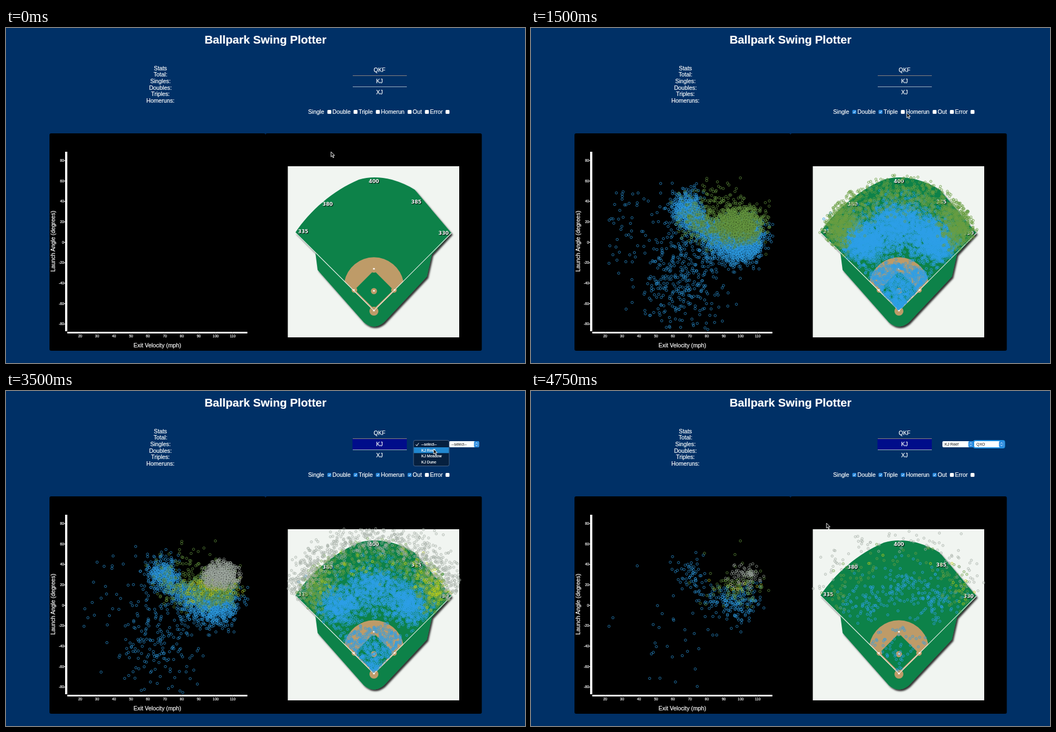
An HTML page with a canvas for the animation above (5 s loop, 931 by 601 pixels).

```html
<!DOCTYPE html>
<html lang="en">
<head>
<meta charset="utf-8">
<title>Ballpark Swing Plotter</title>
<style>
  html, body { margin: 0; width: 100%; height: 100%; overflow: hidden; background: #003066; }
  svg, canvas { position: absolute; left: 0; top: 0; width: 931px; height: 601px; }
  text { font: 10.3px "Liberation Sans", Arial, sans-serif; fill: #fff; stroke: #fff; stroke-width: .2px; }
  .title { font-size: 20.6px; font-weight: bold; }
  .mid text, .mid { text-anchor: middle; }
  .tick { font-size: 6.4px; }
  .small text { font-size: 7px; }
  .wall text { font: bold 8.8px "DejaVu Sans", sans-serif; text-anchor: middle; stroke: none; text-shadow: 1px 1px 1px #000; }
  .dark { fill: #111; stroke: none; }
</style>
</head>
<body>
<svg id="base" viewBox="0 0 931 601">
  <defs>
    <filter id="shadow" x="-10%" y="-10%" width="120%" height="120%">
      <feDropShadow dx="2.5" dy="3" stdDeviation="1.5" flood-color="#000" flood-opacity=".8"/>
    </filter>
  </defs>
  <text class="title mid" x="465.5" y="28">Ballpark Swing Plotter</text>
  <g id="stats" class="mid"></g>
  <rect id="league" x="621.5" y="86" width="97.5" height="19.5"/>
  <path d="M622 85.5H719" stroke="#8a827e"/>
  <path d="M622 105.5H719" stroke="#a5b3c3"/>
  <g class="mid">
    <text x="670" y="79">QKF</text>
    <text x="670" y="99">KJ</text>
    <text x="670" y="119">XJ</text>
  </g>
  <g id="filters"></g>

  <rect x="78" y="189" width="387.5" height="390" rx="3"/>
  <rect x="465.5" y="189" width="388" height="390" rx="3"/>
  <rect x="460" y="192" width="12" height="387"/>
  <path d="M108 222V544" stroke="#fff" stroke-width="4"/>
  <path d="M110 546.5H433" stroke="#fff" stroke-width="3"/>
  <g id="ticks"></g>
  <text class="mid" x="271.5" y="573">Exit Velocity (mph)</text>
  <text class="mid" transform="translate(88 382.5) rotate(-90)">Launch Angle (degrees)</text>

  <rect x="505.5" y="248" width="307.5" height="307" fill="#f1f5f1"/>
  <path filter="url(#shadow)" fill="#0a824a" d="M519 367C545 328 586 292 633 272Q660 264 692 272Q716 279 733 290L799 368L764 406L755 446L678 528Q660 543 642 528L559 434L555 403Z"/>
  <g fill="#be9b68">
    <path d="M607 455A54 54 0 0 1 713 455L660 507Z"/>
    <path d="M660 435L695 470L660 504L625 470Z" fill="#0a824a"/>
    <path d="M624 470L660 506L697 470" fill="none" stroke="#be9b68" stroke-width="3"/>
    <circle cx="660" cy="432" r="7"/>
    <circle cx="625" cy="470" r="5"/>
    <circle cx="696" cy="470" r="5"/>
    <circle cx="660" cy="472" r="5.5"/>
    <circle cx="660" cy="508" r="8"/>
  </g>
  <path d="M519 367L660 507L799 368" fill="none" stroke="#e8eee8" stroke-width="1.2"/>
  <path d="M658.5 432h3M622.5 470h3M695.5 470h3M658.5 471.5h3M658.5 507h3" stroke="#fff" stroke-width="2.5"/>
  <g class="wall">
    <text x="660" y="278">400</text>
    <text x="577" y="319">380</text>
    <text x="736" y="315">385</text>
    <text x="533" y="368">335</text>
    <text x="785" y="371">330</text>
  </g>
</svg>
<canvas id="hits" width="931" height="601"></canvas>
<svg id="overlay" viewBox="0 0 931 601">
  <g id="selects" class="small"></g>
  <g id="divisionMenu" class="small"></g>
  <g id="teamMenu" class="small"></g>
  <path id="cursor" d="M0 0V9.2L2.1 7.2L3.7 10.8L5.2 10.1L3.6 6.7H6.5Z" fill="#111" stroke="#fff" stroke-width=".9"/>
</svg>
<script>
const $ = id => document.getElementById(id);
const ctx = $('hits').getContext('2d');
const STEP = 250, STEPS = 20;

// Cursor position for each step
const cursorPath = [
  [583, 222], [582, 190], [579, 160], [579, 148], [672, 156], [626, 149], [674, 152],
  [666, 149], [698, 151], [723, 149], [712, 125], [682, 95], [718, 95], [760, 96],
  [767, 104], [820, 100], [810, 125], [810, 125], [810, 125], [530, 237]
];

// ---- Random helpers ----
let seed = 20177;
function rand() {
  seed = seed + 0x6D2B79F5 | 0;
  let v = Math.imul(seed ^ seed >>> 15, 1 | seed);
  v = v + Math.imul(v ^ v >>> 7, 61 | v) ^ v;
  return ((v ^ v >>> 14) >>> 0) / 4294967296;
}
const between = (a, b) => a + (b - a) * rand();
const gauss = () => Math.sqrt(-2 * Math.log(1 - rand())) * Math.cos(2 * Math.PI * rand());
const blob = (x, y, sx, sy) => [x + sx * gauss(), y + sy * gauss()];

// ---- Field geometry: angle in degrees from straight-away centre ----
const polar = (deg, r) => {
  const a = deg * Math.PI / 180;
  return [660 + r * Math.sin(a), 507 - r * Math.cos(a)];
};
const wall = deg => 199 + 40 * Math.cos(deg * Math.PI / 90);
const inFair = ([x, y]) => Math.abs(x - 660) < 505 - y;

function retry(make, accept) {
  let p;
  do p = make(); while (!accept(p));
  return p;
}

// ---- Where each kind of hit lands, in the chart and on the field ----
function singleChart() {
  return retry(() => {
    const k = rand();
    if (k < .54) return blob(374, 375, 24, 20);
    if (k < .80) {
      const s = rand();
      return blob(274 + 105 * s, 325 + 95 * s - 40 * s * s, 12, 13);
    }
    if (k < .90) return blob(280, 325, 13, 15);
    if (k < .93) return blob(310, 380, 32, 34);
    if (k < .98) return blob(270, 462, 38, 40);
    if (k < .992) return [between(138, 250), between(292, 425)];
    return blob(330, 305, 45, 24);
  }, ([x, y]) => x > 136 && x < 434 && y > 226 && y < 545 &&
    (x < 312 || y > 343 + 5 * gauss() || rand() < .012) &&
    (x < 414 || rand() < .3));
}
function singleField() {
  return retry(() => {
    const k = rand();
    if (k < .17) return polar(between(-42, 42), 84 * rand() ** .7);
    if (k < .36) return blob(600, 382, 20, 19);
    if (k < .57) return blob(660, 347, 25, 20);
    if (k < .76) return blob(724, 381, 19, 19);
    return polar(between(-42, 42), 144 + 25 * gauss());
  }, inFair);
}
function doubleChart() {
  return retry(() => {
    const k = rand();
    if (k < .80) return blob(374, 352, 22, 15);
    if (k < .93) return blob(315, 348, 26, 18);
    return blob(325, 312, 30, 20);
  }, ([x, y]) => x > 244 && x < 428 && y > 265 && y < 430);
}
function doubleField() {
  return retry(() => {
    const k = rand();
    const deg = k < .3 ? -35 + 7 * gauss() : k < .6 ? 35 + 7 * gauss() : between(-40, 40);
    return polar(deg, wall(deg) * (.89 + .08 * gauss()));
  }, ([x, y]) => {
    const r = Math.hypot(x - 660, y - 507);
    const deg = Math.atan2(x - 660, 507 - y) * 180 / Math.PI;
    return Math.abs(deg) < 45.5 && r < wall(deg) * 1.02;
  });
}
const tripleChart = () => retry(() => blob(366, 355, 26, 13), ([x]) => x < 425);
function tripleField() {
  return retry(() => {
    const deg = rand() < .5 ? 34 + 6 * gauss() : between(-40, 42);
    return polar(deg, wall(deg) * (.87 + .06 * gauss()));
  }, inFair);
}
const homerunChart = () => retry(() => blob(385, 330, 17, 13),
  ([x, y]) => ((x - 385) / 38) ** 2 + ((y - 330) / 29) ** 2 < 1);
const homerunField = () => retry(() => {
  const deg = between(-46, 46);
  return polar(deg, wall(deg) * (1.03 + .075 * gauss()));
}, ([x, y]) => x > 505 && x < 814 && y > 244 + 6 * Math.abs(gauss()) && y < 375);

const makeHits = (count, chart, field) =>
  Array.from({ length: count }, () => ({ chart: chart(), field: field(), rank: rand() }));

const kinds = [
  { label: 'Single', x: 542, box: 580, checked: 3, color: '47,159,232', hits: makeHits(5200, singleChart, singleField) },
  { label: 'Double', x: 585.5, box: 627, checked: 5, color: '106,158,68', hits: makeHits(1700, doubleChart, doubleField) },
  { label: 'Triple', x: 632.5, box: 667, checked: 7, color: '196,208,24', hits: makeHits(210, tripleChart, tripleField) },
  { label: 'Homerun', x: 672.5, box: 724, checked: 9, color: '166,176,168', hits: makeHits(1400, homerunChart, homerunField) },
  { label: 'Out', x: 729.5, box: 755, checked: Infinity, hits: [] },
  { label: 'Error', x: 760.5, box: 792, checked: Infinity, hits: [] }
];

function dot([x, y]) {
  ctx.beginPath();
  ctx.arc(x, y, 2.1, 0, 2 * Math.PI);
  ctx.fill();
  ctx.stroke();
}

function drawHits(step) {
  const share = step < 12 ? 1 : step < 15 ? .5 : step < 18 ? .25 : .06;
  ctx.clearRect(0, 0, 931, 601);
  ctx.lineWidth = .85;
  for (const { hits, checked, color } of kinds) {
    if (step <= checked) continue;
    ctx.strokeStyle = `rgba(${color},.85)`;
    for (const hit of hits) {
      if (hit.rank > share) continue;
      ctx.fillStyle = 'rgba(0,0,0,.12)';
      dot(hit.chart);
      ctx.fillStyle = `rgba(${color},.15)`;
      dot(hit.field);
    }
  }
}

// ---- Static parts made from lists ----
$('stats').innerHTML = ['Stats', 'Total:', 'Singles:', 'Doubles:', 'Triples:', 'Homeruns:']
  .map((s, i) => `<text x="277" y="${75.7 + 11.65 * i}">${s}</text>`).join('');

let ticks = '';
for (let v = -80; v <= 80; v += 20) {
  const y = 384.5 - v * 1.833;
  ticks += `<path d="M103.5 ${y}H107" stroke="#fff"/>
    <text class="tick" x="104" y="${y + 2.3}" text-anchor="end">${v}</text>`;
}
for (let v = 20; v <= 110; v += 10) {
  const x = 133 + (v - 20) * 3.04;
  ticks += `<path d="M${x} 545V549" stroke="#888" stroke-width=".8"/>
    <text class="tick mid" x="${x}" y="554.5">${v}</text>`;
}
$('ticks').innerHTML = ticks;

function drawFilters(step) {
  $('filters').innerHTML = kinds.map(({ label, x, box, checked }) => {
    const on = step >= checked;
    return `<text x="${x}" y="153.5">${label}</text>
      <rect x="${box - 3.5}" y="147" width="7" height="7" rx="1.5" fill="${on ? '#2b8be0' : '#fff'}"/>
      ${on ? `<path d="M${box - 1.8} 150.6l1.4 1.6l2.4 -3.4" fill="none" stroke="#fff"/>` : ''}`;
  }).join('');
}

function selectBox(x, width, label, focused) {
  const right = x + width;
  return `${focused ? `<rect x="${x - 1}" y="89" width="${width + 2}" height="13" rx="3" fill="none" stroke="#1c8de0" stroke-width="2"/>` : ''}
    <rect x="${x}" y="90" width="${width}" height="11" rx="2" fill="#fff"/>
    <rect x="${right - 9}" y="90" width="9" height="11" rx="2" fill="#2b8be0"/>
    <path d="M${right - 6.3} 94.5l1.8 -2l1.8 2m0 2l-1.8 2l-1.8 -2" fill="none" stroke="#fff" stroke-width=".9"/>
    <text class="dark" x="${x + 4}" y="98">${label}</text>`;
}

function menu(x, width, items, active) {
  const row = 10.4;
  return `<rect x="${x}" y="88.5" width="${width}" height="${items.length * row + 4.5}" rx="3" fill="#06203f" stroke="#5b7190" stroke-width=".8"/>
    <rect x="${x + .5}" y="${90.6 + active * row}" width="${width - 1}" height="${row}" fill="#2187cf"/>
    <path d="M${x + 4} 96l2 2.4l3.4 -5" fill="none" stroke="#fff"/>
    ${items.map((s, i) => `<text x="${x + 14}" y="${98.3 + i * row}">${s}</text>`).join('')}`;
}

const none = '--select--';
const divisions = [none, 'KJ Reef', 'KJ Meadow', 'KJ Dune'];
const teams = [none, 'BQU', 'DRO', 'QXO', 'TEV', 'WUK', 'GIR', 'HOZ', 'JUP', 'KEB',
  'LUQ', 'MOF', 'PIV', 'RUX', 'VAJ', 'ZOD'];

function drawSelects(step) {
  $('selects').innerHTML = step < 12 ? '' :
    selectBox(738, 55.5, step < 15 ? none : divisions[1], false) +
    selectBox(795, 53.5, step < 18 ? none : teams[3], step >= 16);
  $('divisionMenu').innerHTML = step === 13 || step === 14 ? menu(731, 64, divisions, step - 13) : '';
  $('teamMenu').innerHTML = step === 16 ? menu(787, 64, teams, 3) : '';
}

function render(step) {
  drawHits(step);
  drawFilters(step);
  drawSelects(step);
  $('league').setAttribute('fill', step < 11 ? 'none' : step === 11 ? '#28752f' : '#000d8a');
  $('cursor').setAttribute('transform', `translate(${cursorPath[step]})`);
}

let shown = -1;
const start = performance.now();
function tick() {
  const step = Math.floor((performance.now() - start) / STEP) % STEPS;
  if (step !== shown) render(shown = step);
  requestAnimationFrame(tick);
}
tick();
</script>
</body>
</html>
```
